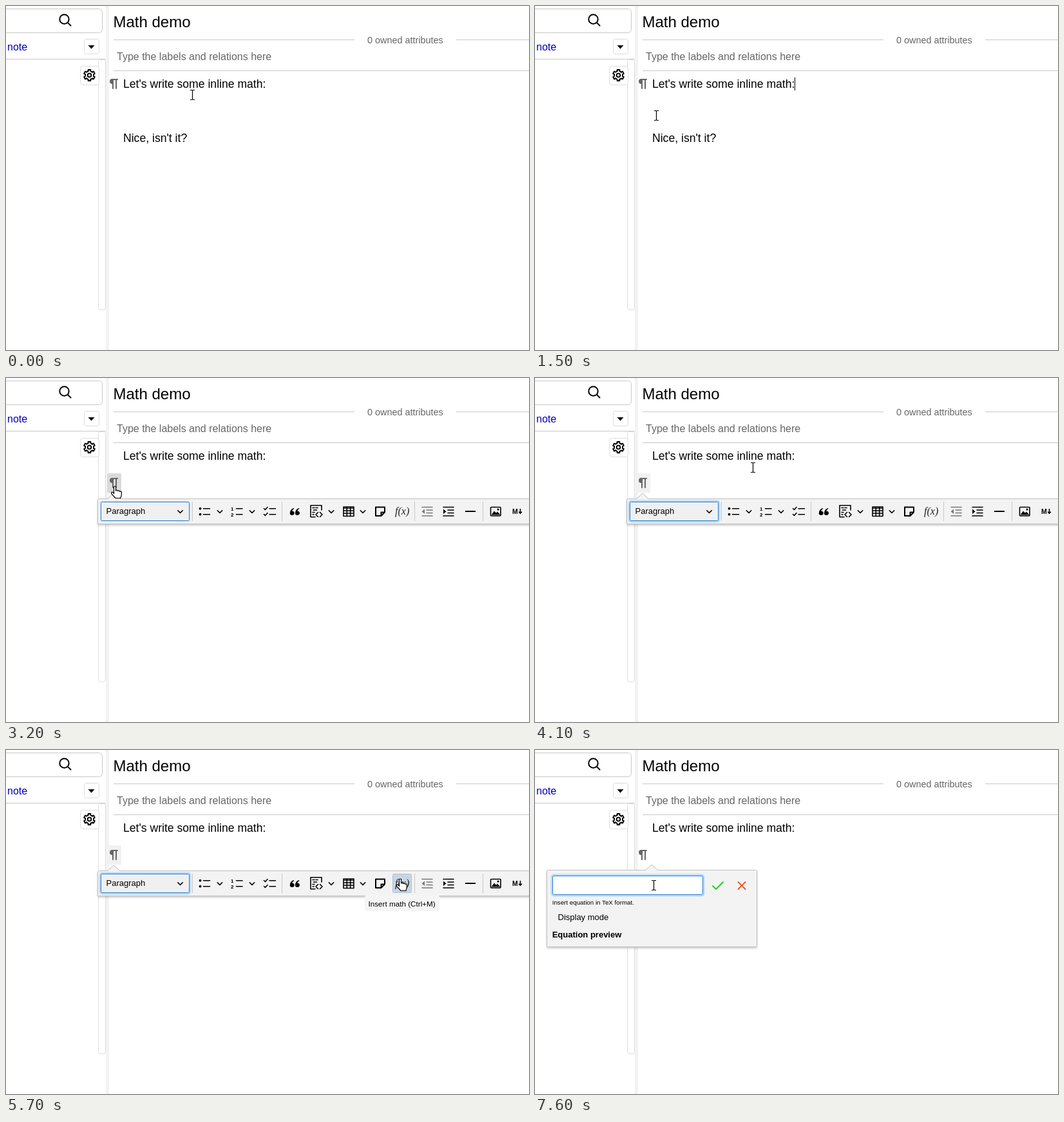
These frames come from a looping animation (812x534 px, 8 s). An HTML page:

```html
<!DOCTYPE html>
<html lang="en">
<head>
<meta charset="utf-8">
<title>Inline math</title>
<style>
  html, body { margin: 0; height: 100%; overflow: hidden; background: #fff; }
  svg { display: block; width: 812px; height: 534px; font: 13px "Liberation Sans", Arial, sans-serif; }
  .line { fill: none; stroke: #000; stroke-width: 1.6; stroke-linecap: round; stroke-linejoin: round; }
  .rule { fill: none; stroke: #c8c8c8; }
  .box { fill: #fff; stroke: #ddd; }
  .panel { fill: #f3f3f3; stroke: #c0c0c0; }
  .muted { fill: #666; }
  .body { font-size: 17.6px; }
  .tip { font-size: 11.7px; }
  .floating { filter: drop-shadow(0 2px 1.5px rgba(0, 0, 0, .2)); }
  .glow { fill: none; stroke: #b9dafb; stroke-width: 4; }
  .focus { stroke: #2680c9; }
</style>
</head>
<body>
<svg viewBox="0 0 812 534">
  <defs>
    <path id="chevron" class="line" d="M-3.7-1.8 0 1.9 3.7-1.8"/>
    <path id="tooth" d="M-2-6.7V-9H2v2.3L4.8-5.08"/>
    <path id="tick" class="line" d="M0 0l2 2 3.5-4"/>
    <path id="quote" d="M0 3.5C0-1 2-4 6-5l.5 1.3C4.5-3 3.7-2 3.5-.6c2.200 0 3.500 1.300 3.500 3.300C7 4.500 5.500 6 3.600 6 1.400 6 0 4.800 0 3.500z"/>
  </defs>

  <!-- sidebar -->
  <rect x="155" width="5" height="534" fill="#f3f3f3"/>
  <rect class="rule" x="-10.500" y="4.500" width="160" height="37" rx="5"/>
  <g class="line" style="stroke-width:2"><circle cx="90.500" cy="20.500" r="7.200"/><path d="M96 26l4.500 4.500"/></g>
  <text x="2" y="69" font-size="16" fill="#00b">note</text>
  <rect class="box" x="121.500" y="51.500" width="23" height="23" rx="3"/>
  <path d="M127.500 61h10l-5 5.500z"/>
  <path class="rule" d="M0 82.500H155"/>
  <rect class="box" x="143.500" y="83.500" width="11" height="388" rx="3"/>
  <rect class="box" x="115.500" y="93.500" width="29" height="29" rx="4"/>
  <g id="gear" class="line" style="stroke-width:2" transform="translate(129.500 107.500) scale(.95)"><circle r="3"/></g>

  <!-- note -->
  <text x="166.500" y="33" font-size="24">Math demo</text>
  <path class="rule" d="M167 52.500H541M699 52.500H812M167 100.500H812"/>
  <text class="muted" x="561" y="58" font-size="14.400">0 owned attributes</text>
  <text class="muted" x="172" y="84" font-size="16">Type the labels and relations here</text>
  <text class="body" x="182" y="127">Let's write some inline math:</text>
  <text class="body" x="182" y="211">Nice, isn't it?</text>
  <rect id="blockHover" x="157" y="148" width="22" height="30" rx="1"/>
  <path id="pilcrow" fill="#666" d="M7 2h8a1 1 0 0 1 0 2h-1v13a1 1 0 1 1-2 0V4H9v13a1 1 0 1 1-2 0v-7a4 4 0 0 1 0-8z"/>

  <g id="toolbar">
    <g class="floating">
      <rect class="panel" x="142.500" y="187.500" width="690" height="39" rx="2"/>
      <path class="panel" d="M157 188l10-9 10 9"/>
    </g>
    <path stroke="#f3f3f3" d="M158 187.900H176"/>
    <rect id="listGlow" class="glow" x="146.500" y="191.500" width="139" height="31" rx="3"/>
    <rect class="focus" x="147.500" y="192.500" width="137" height="29" rx="2" fill="#f0f0f0"/>
    <text x="155.500" y="211">Paragraph</text>
    <path class="rule" d="M289.500 192v30M428.500 192v30M634.500 192v30M740.500 192v30"/>
    <g id="chevrons"></g>
    <circle cx="301.500" cy="202.700" r="1.900"/><circle cx="301.500" cy="211.700" r="1.900"/>
    <path class="line" d="M306.500 202.700h10M306.500 211.700h10M357.500 202.700h9.500M357.500 211.700h9.500M409 202.700h9.500M409 211.700h9.500"/>
    <g font-size="8" font-weight="bold"><text x="349" y="206">1</text><text x="349" y="215">2</text></g>
    <use href="#tick" x="400.500" y="202.500"/><use href="#tick" x="400.500" y="211.500"/>
    <use href="#quote" x="440.800" y="207"/><use href="#quote" x="449" y="207"/>
    <path class="line" stroke-width="1.400" d="M490 205v-7.200h-17v18h7M476 201.500h3M481 201.500h3M477.500 205h5M476 208.500h3M476 212h2M484.500 208.500l-3.500 3.500 3.500 3.500M487.500 208.500l3.500 3.500-3.500 3.500"/>
    <path class="line" d="M524 200h16v14.500h-16zM524 202h16M524 206h16M524 210h16M529.300 201v13.500M534.700 201v13.500"/>
    <path class="line" style="stroke-width:2" d="M574 200.500h14v8l-5.500 5.500H574zM588 208.500h-5.500v5.500"/>
    <rect id="mathHover" x="600.500" y="192.500" width="29" height="29" rx="2"/>
    <text x="604" y="212" font-size="16" font-style="italic" font-family="Liberation Serif, Times, serif" fill="#222">f(x)</text>
    <g opacity=".5"><path class="line" d="M646 200.500h16M653 205h9M653 209.500h9M646 214h16"/><path d="M650 203.500v7.500l-4.500-3.700z"/></g>
    <path class="line" d="M679 200.500h16M686 205h9M686 209.500h9M679 214h16"/><path d="M679 203.500v7.500l4.500-3.700z"/>
    <path class="line" style="stroke-width:2;stroke-linecap:butt" d="M713 207h16"/>
    <rect class="line" x="752.500" y="200.500" width="15.500" height="13.500" rx="1"/>
    <path d="M753.500 212.500l4.500-6 3 3 2-2 4.500 5z"/><circle cx="764" cy="204" r="1.500"/>
    <text x="786" y="211" font-size="10.500" font-weight="bold">M</text>
    <path class="line" d="M798.500 203.500v6M796.500 208l2 2.200 2-2.200"/>
  </g>

  <g id="popup">
    <g class="floating">
      <rect class="panel" x="18.500" y="186.500" width="326" height="119" rx="2"/>
      <path class="panel" d="M171 187l10-9 10 9"/>
    </g>
    <path stroke="#f3f3f3" d="M172 186.900H190"/>
    <rect id="inputGlow" class="glow" x="26.500" y="194.500" width="235" height="31" rx="3"/>
    <rect class="focus" x="27.500" y="195.500" width="233" height="29" rx="2" fill="#fff"/>
    <path class="line" style="stroke:#1fd51f;stroke-width:2" d="M276 211l5 5 11-11"/>
    <path class="line" style="stroke:#ee5a2a;stroke-width:2" d="M315.500 205l11 11M326.500 205l-11 11"/>
    <text x="26.700" y="240" font-size="9.750">Insert equation in TeX format.</text>
    <text x="35.500" y="264">Display mode</text>
    <text x="26.700" y="291" font-weight="bold">Equation preview</text>
  </g>

  <g id="blockTip" class="tip"><rect x="137" y="183" width="61" height="24" rx="2" fill="#f5f5f5"/><text x="142" y="199">Edit block</text></g>
  <g id="mathTip" class="tip"><rect x="557" y="226" width="116" height="24" rx="2" fill="#f5f5f5"/><text x="562.500" y="243">Insert math (Ctrl+M)</text></g>
  <rect id="caret" width="1"/>

  <g id="beam" fill="none">
    <path stroke="#fff" stroke-width="3" d="M-3-7.500h6M0-7v14M-3 7.500h6"/>
    <path stroke="#000" stroke-width="1.200" d="M-3.500-7.500h2.500L0-6.700 1-7.500h2.500M0-7v14M-3.500 7.500h2.500L0 6.700l1 .8h2.500"/>
  </g>
  <path id="hand" fill="#fff" stroke="#000" stroke-width="1.200" stroke-linejoin="round"
    d="M-2.500 10V1.500C-2.500-.5.500-.5.500 1.500V7C1 5.700 3.300 5.800 3.500 7.500 4.300 6.300 6.300 6.600 6.500 8.300 7.500 7.300 9.300 7.800 9.300 9.500V13c0 2-1.300 3-1.300 5.500H-.5C-1-1 16-5 14-6.500 11-7 9.500-5 8.700-4 9.500z"/>
</svg>
<script>
const $ = id => document.getElementById(id);
const LOOP = 8000, STEP = 100;

$('gear').innerHTML += [0, 60, 120, 180, 240, 300]
  .map(a => `<use href="#tooth" transform="rotate(${a})"/>`).join('');
$('chevrons').innerHTML = [270.5, 332, 382, 505, 554]
  .map(x => `<use href="#chevron" x="${x}" y="207.500"/>`).join('');
// Pointing hand, hotspot at the fingertip.
$('hand').setAttribute('d', 'M-2.5 10V1.500C-2.500-.5.500-.5.500 1.500V7C1 5.700 3.300 5.800 3.500 7.500' +
  'C4.300 6.300 6.300 6.600 6.500 8.300C7.500 7.300 9.300 7.800 9.300 9.500V13C9.300 15 8 16 8 18.500H-.5' +
  'C-1 16-5 14-6.500 11C-7 9.500-5 8.700-4 9.500L-2.500 11.500z');

// Pointer path: time, x, y; positions between keys are interpolated in steps.
const path = [
  [0, 289.5, 138], [800, 289.5, 138], [1000, 272, 143], [1200, 222, 158], [1400, 192, 169],
  [1500, 188.5, 170], [2200, 188.5, 170], [2300, 182, 169], [2500, 170, 168], [4000, 170, 168],
  [4100, 338.5, 139], [4300, 470, 160], [4500, 565, 184], [4700, 603, 197], [4900, 611, 201],
  [5000, 613, 200], [5700, 613, 200], [5800, 612.5, 200], [6200, 612.5, 200], [6300, 594.5, 205],
  [6400, 450, 206], [6500, 300, 195], [6600, 224, 188], [6700, 224, 188], [6800, 195, 204],
  [6900, 184.5, 210], [LOOP, 184.5, 210]
];
// Caret: from, to, x, y
const carets = [
  [300, 900, 403, 111], [1400, 1900, 403, 111], [1900, 2400, 182, 153],
  [5900, 6400, 34, 202], [7400, 7600, 34, 202]
];

const within = (t, from, to) => t >= from && t < to;
const fade = (t, from, ms) => Math.max(0, Math.min(1, (t - from) / ms));
const show = (id, on) => $(id).setAttribute('opacity', +on);
const place = (id, x, y) => $(id).setAttribute('transform', `translate(${x} ${y})`);

function pointerAt(t) {
  const i = path.findIndex(key => key[0] > t);
  const [t0, x0, y0] = path[i - 1], [t1, x1, y1] = path[i];
  const k = (t - t0) / (t1 - t0);
  return [x0 + (x1 - x0) * k, y0 + (y1 - y0) * k];
}

function render(t) {
  const [x, y] = pointerAt(t);
  const pointing = within(t, 2400, 4100) || within(t, 4600, 5800);
  place('beam', x, y);
  place('hand', x, y);
  show('beam', !pointing);
  show('hand', pointing);

  place('pilcrow', 158, t < 2300 ? 111 : 153);
  show('blockHover', within(t, 2400, 5800));
  $('blockHover').setAttribute('fill', t < 4100 ? '#dadada' : '#f1f1f1');
  show('blockTip', t < 2600 || t >= 3200 ? 0 : t < 2700 ? 0.25 : 1);

  show('toolbar', within(t, 3200, 5800));
  show('listGlow', fade(t, 3100, 300));
  show('mathHover', within(t, 4600, 5800));
  $('mathHover').setAttribute('fill', t < 5700 ? '#dfdfdf' : '#c8d6e2');
  $('mathHover').setAttribute('stroke', t < 5700 ? '#dfdfdf' : '#a9c3da');
  show('mathTip', t < 5200 || t >= 5800 ? 0 : t < 5300 ? 0.4 : 1);

  show('popup', t >= 5800);
  show('inputGlow', fade(t, 5700, 200));

  const caret = carets.find(c => within(t, c[0], c[1]));
  show('caret', !!caret);
  if (caret) {
    place('caret', caret[2], caret[3]);
    $('caret').setAttribute('height', caret[2] === 34 ? 15 : 20);
  }
}

const start = performance.now();
function frame() {
  const t = (performance.now() - start) % LOOP;
  render(Math.floor(t / STEP) * STEP);
  requestAnimationFrame(frame);
}
frame();
</script>
</body>
</html>
```
